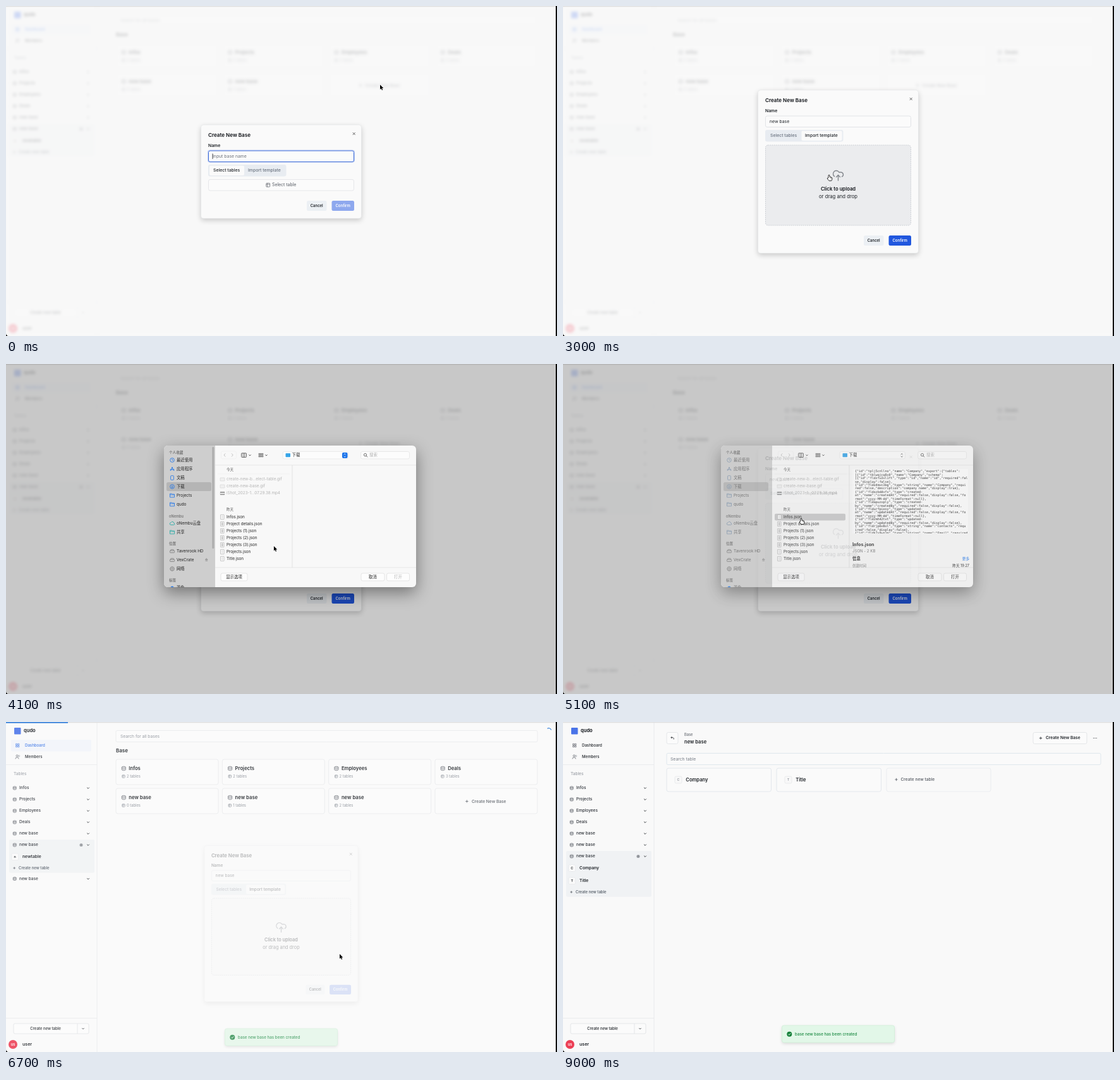
These frames come from a looping animation (872x522 px, 9700 ms). An HTML page with a canvas:

```html
<!DOCTYPE html>
<html lang="en">
<head>
<meta charset="utf-8">
<title>Create a base from a template</title>
<style>
html, body { margin: 0; width: 100%; height: 100%; overflow: hidden; background: #f9f9f9; }
canvas { display: block; width: 872px; height: 522px; }
</style>
</head>
<body>
<canvas id="stage"></canvas>
<script>
const W = 872, H = 522, LOOP = 9700, STEP = 100;
const S = window.devicePixelRatio || 1;
const BG = '#f9f9f9', INK = '#1f2328', SOFT = '#555a62', MUTED = '#8d929a';
const LINE = '#e6e8ea', BLUE = '#2157de';
const SANS = 'Inter, "Noto Sans CJK SC", "Noto Sans CJK", sans-serif';
const MONO = '"DejaVu Sans Mono", monospace';

function setup(cv) {
  cv.width = W * S;
  cv.height = H * S;
  const g = cv.getContext('2d');
  g.scale(S, S);
  return g;
}
const main = setup(document.getElementById('stage'));
const spare = setup(document.createElement('canvas'));
let c = main;

// ---------- drawing helpers ----------
function txt(s, x, y, size, color = INK, weight = 400, align = 'left', face = SANS) {
  c.font = `${weight} ${size}px ${face}`;
  c.fillStyle = color;
  c.textAlign = align;
  c.textBaseline = 'middle';
  c.fillText(s, x, y);
}
function box(x, y, w, h, r, fill, stroke, lw = 0.8) {
  c.beginPath();
  c.roundRect(x, y, w, h, r);
  if (fill) { c.fillStyle = fill; c.fill(); }
  if (stroke) { c.strokeStyle = stroke; c.lineWidth = lw; c.stroke(); }
}
function shadowBox(x, y, w, h, r, fill, blur, dy, alpha) {
  c.save();
  c.shadowColor = `rgba(0,0,0,${alpha})`;
  c.shadowBlur = blur * S;
  c.shadowOffsetY = dy * S;
  box(x, y, w, h, r, fill);
  c.restore();
}
function path(points, color, lw = 0.8) {
  c.beginPath();
  for (let i = 0; i < points.length; i += 2) c.lineTo(points[i], points[i + 1]);
  c.strokeStyle = color;
  c.lineWidth = lw;
  c.stroke();
}
function ring(x, y, r, color, lw = 0.8, from = 0, to = 7) {
  c.beginPath();
  c.arc(x, y, r, from, Math.min(to, from + Math.PI * 2));
  c.strokeStyle = color;
  c.lineWidth = lw;
  c.stroke();
}
function dot(x, y, r, color) {
  c.beginPath();
  c.arc(x, y, r, 0, 7);
  c.fillStyle = color;
  c.fill();
}
const chevron = (x, y, color = INK, r = 1.8) =>
  path([x - r, y - r / 2, x, y + r / 2, x + r, y - r / 2], color, 0.9);
function plus(x, y, color, r = 2.2) {
  path([x - r, y, x + r, y], color);
  path([x, y - r, x, y + r], color);
}
function grid(x, y, s, color) {
  box(x - s / 2, y - s / 2, s, s, 0.8, null, color, 0.7);
  path([x - s / 2, y - s / 6, x + s / 2, y - s / 6], color, 0.6);
  path([x - s / 6, y - s / 2, x - s / 6, y + s / 2], color, 0.6);
}
function drum(x, y, s, color) {
  const w = s / 2, h = s * 0.36;
  c.beginPath();
  c.ellipse(x, y - h, w, s * 0.17, 0, 0, 7);
  c.moveTo(x - w, y - h);
  c.lineTo(x - w, y + h);
  c.ellipse(x, y + h, w, s * 0.17, 0, Math.PI, 0, true);
  c.lineTo(x + w, y - h);
  c.moveTo(x - w, y);
  c.ellipse(x, y, w, s * 0.17, 0, Math.PI, 0, true);
  c.strokeStyle = color;
  c.lineWidth = 0.7;
  c.stroke();
}
// Draws a group on its own surface so that it fades as one.
function layer(alpha, draw) {
  if (alpha <= 0) return;
  if (alpha >= 1) return draw();
  c = spare;
  c.clearRect(0, 0, W, H);
  draw();
  c = main;
  c.globalAlpha = alpha;
  c.drawImage(spare.canvas, 0, 0, W, H);
  c.globalAlpha = 1;
}

// ---------- timing ----------
const clamp = (v, a = 0, b = 1) => Math.max(a, Math.min(b, v));
// keys: rows of [time, value, ...]
function track(t, keys, ease = u => u) {
  let i = 0;
  while (i < keys.length - 2 && t >= keys[i + 1][0]) i++;
  const a = keys[i], b = keys[i + 1];
  const u = ease(clamp((t - a[0]) / (b[0] - a[0])));
  return a.slice(1).map((v, k) => v + (b[k + 1] - v) * u);
}
const smooth = u => u * u * (3 - 2 * u);

const POINTER = [
  [100, 592, 124.5], [600, 470, 244], [1800, 470, 244], [2200, 412, 258], [2400, 412, 258],
  [2900, 421, 267], [3500, 421, 267], [3700, 426, 290], [4000, 426, 290], [4800, 377, 244],
  [5100, 377, 244], [5300, 394, 242], [5600, 440, 262], [6300, 528, 367], [6900, 528, 367],
  [7900, 306, 217], [8100, 293, 200], [8400, 293, 200], [8800, 640, 20]
];
const DIM = [[3400, 0], [3700, 0.13], [3900, 0.195], [5100, 0.195], [5200, 0.1], [5300, 0.014], [5400, 0]];
const PANEL_Y = [[3500, 114], [3700, 124], [3900, 129], [5100, 129], [5300, 115], [5400, 112]];
const PANEL_FADE = [[3400, 0], [3600, 1], [5000, 1], [5100, 0.82], [5200, 0.4], [5300, 0.07], [5400, 0]];

// ---------- application ----------
function sidebar(bases, open, tables, home) {
  path([144, 0, 144, H], LINE);
  path([0, 67.5, 144, 67.5], LINE);
  path([0, 468.5, 144, 468.5], LINE);
  box(13, 9, 10.5, 10.5, 1, '#4a74e8');
  txt('qudo', 28, 14, 7.5, INK, 700);
  if (home) box(8, 28, 127, 18.5, 2, '#f1f4f9');
  const tint = home ? '#3b74e6' : SOFT;
  for (let i = 0; i < 4; i++) box(15.5 + (i % 2) * 3.2, 34.3 + (i >> 1) * 3.2, 2.2, 2.2, 0.3, null, tint, 0.7);
  txt('Dashboard', 30, 37.5, 6.1, home ? tint : INK, 500);
  ring(17.5, 53.5, 1.5, SOFT, 0.7);
  ring(17.5, 58.5, 2.6, SOFT, 0.7, Math.PI, Math.PI * 2);
  ring(20.5, 53.8, 1.2, MUTED, 0.7);
  txt('Members', 30, 55.5, 6.1, INK, 500);
  txt('Tables', 12, 82, 6.6, MUTED);

  let y = 104.5;
  bases.forEach((name, i) => {
    const opened = i === open;
    const end = y + 16.5 + tables.length * 20;
    if (opened) box(5, y - 8.5, 135, end - y + 16, 2, '#f0f2f4');
    drum(13.7, y, 4.8, SOFT);
    txt(name, 21, y, 6.5, '#2c3037', 450);
    chevron(130, y);
    if (opened) {
      dot(119, y, 2.6, '#a2a6ad');
      ring(119, y, 1, '#777', 0.6);
      tables.forEach((s, k) => {
        const ty = y + 18.5 + 20 * k;
        box(9, ty - 5, 10.5, 10.5, 1.5, '#fafafa', '#e2e4e7', 0.6);
        txt(s[0], 14.2, ty + 0.2, 5.3, INK, 600, 'center');
        txt(s, 26, ty, 6.7, INK, 600);
      });
      plus(13.2, end, SOFT, 1.8);
      txt('Create new table', 20, end, 6, '#4d5661', 500);
      y = end + 17;
    } else y += 18;
  });

  box(12, 477, 119, 16, 2, '#fbfbfb', '#dfe1e4');
  path([113, 477, 113, 493], '#dfe1e4');
  txt('Create new table', 62.5, 485, 6, INK, 500, 'center');
  chevron(122, 485, INK, 1.5);
  dot(11, 510, 7, '#ec3f55');
  txt('us', 11, 510, 5.6, '#fff', 600, 'center');
  txt('user', 26, 510, 7, INK, 600);
}

function dashboard(created) {
  const bases = ['Infos', 'Projects', 'Employees', 'Deals', 'new base', 'new base'];
  const counts = [2, 2, 2, 3, 0, 1, 2];
  if (created) bases.push('new base');
  sidebar(bases, 5, ['newtable'], true);
  box(174, 13.5, 667, 18, 2, '#fafafa', LINE);
  txt('Search for all bases', 181, 22.5, 6.65, MUTED);
  txt('Base', 174, 45.5, 8, INK, 600);
  for (let i = 0; i <= bases.length; i++) {
    const x = 174 + (i % 4) * 168.3, y = i < 4 ? 59 : 105;
    box(x, y, 162, 40, 3, '#fafafa', LINE);
    if (i < bases.length) {
      drum(x + 12.3, y + 14.5, 6, SOFT);
      txt(bases[i], x + 20.3, y + 14.5, 7.7, INK, 600);
      grid(x + 12, y + 27, 4.4, MUTED);
      txt(counts[i] + ' tables', x + 17, y + 27, 5.8, MUTED);
    } else {
      plus(x + 50.5, y + 20.5, SOFT);
      txt('Create New Base', x + 58, y + 20.5, 6.65, SOFT, 500);
    }
  }
}

function basePage() {
  const bases = ['Infos', 'Projects', 'Employees', 'Deals', 'new base', 'new base', 'new base'];
  const tables = ['Company', 'Title'];
  sidebar(bases, 6, tables, false);
  box(164, 16.5, 18, 18, 2.5, '#fbfbfb', '#e0e2e5');
  path([172.3, 23, 171, 24.6, 172.3, 26.2], INK);
  path([171, 24.6, 174.2, 24.6, 175.2, 25.6, 175.2, 27.5], INK);
  txt('Base', 192, 20.5, 5.75, SOFT);
  txt('new base', 192, 31.5, 7.6, INK, 600);
  box(744, 16.5, 85, 18, 2.5, '#fbfbfb', '#dfe1e4');
  plus(756, 25.5, INK);
  txt('Create New Base', 764, 25.5, 6.6, INK, 600);
  for (let i = -1; i < 2; i++) dot(842 + i * 2.3, 25.5, 0.6, INK);
  box(164, 49.5, 687, 18, 2, '#fafafa', '#d8e2ea');
  txt('Search table', 170, 58.5, 6.8, '#777d86');
  tables.forEach((s, i) => {
    const x = 164 + i * 174;
    box(x, 73, 165.5, 37, 3, '#fafafa', '#dde3e9');
    box(x + 13, 86, 11, 11, 2, '#f8f8f8', '#dfe1e4', 0.6);
    txt(s[0], x + 18.5, 91.7, 5.4, MUTED, 500, 'center');
    txt(s, x + 30.3, 91.7, 7.6, INK, 600);
  });
  box(512, 73, 165, 37, 3, null, '#e6eaee');
  plus(527.5, 91, SOFT);
  txt('Create new table', 534.5, 91, 6.65, SOFT, 500);
}

function modal(m) {
  const x = 308.5, w = 254, h = m.big ? 258 : 148, y = m.big ? 133 : 188;
  shadowBox(x, y, w, h, 4, '#fafafa', 9, 3, 0.2);
  box(x, y, w, h, 4, null, '#e3e4e6', 0.6);
  txt('Create New Base', 320, y + 17, 8.1, '#0e1116', 600);
  const k = y + 14;
  path([548.7, k - 2, 552.7, k + 2], '#444');
  path([548.7, k + 2, 552.7, k - 2], '#444');
  txt('Name', 320, y + 32.7, 6.8, INK, 600);

  if (m.focus) box(319.5, y + 40, 232, 19, 3, null, '#c9d6f5', 1.2);
  box(320.5, y + 41, 230, 17.5, 2.5, '#fbfbfb', m.focus ? '#3a69d8' : '#dcdfe3', m.focus ? 1 : 0.8);
  txt(m.name || 'Input base name', 327, y + 49.8, 6.85, m.name ? INK : '#6d737c');
  if (m.caret) {
    const cx = 327 + (m.name ? c.measureText(m.name).width + 0.5 : 0);
    path([cx, y + 45.5, cx, y + 54], INK, 0.8);
  }

  box(320, y + 63, 123.5, 18.5, 3, '#e8ecf1');
  if (m.big) box(377.5, y + 64.5, 64, 15.5, 2, '#fafafa');
  else box(322, y + 64.5, 55, 15.5, 2, '#fafafa');
  txt('Select tables', 328, y + 72.3, 6.85, m.big ? '#69727f' : INK, 500);
  txt('Import template', 383, y + 72.3, 6.85, m.big ? INK : '#69727f', 500);

  if (m.big) {
    c.setLineDash([1.8, 1.4]);
    box(320.5, y + 87, 230, 127, 4, m.hover ? '#ebecee' : '#f7f7f8', '#bfc4cb');
    c.setLineDash([]);
    cloud(435.5, y + 134, '#82868c');
    txt('Click to upload', 435.5, y + 156.3, 7.7, '#15181d', 600, 'center');
    txt('or drag and drop', 435.5, y + 168.3, 7.7, INK, 400, 'center');
  } else {
    box(320.5, y + 86.5, 230, 17.5, 2.5, '#fbfbfb', '#e1e3e6');
    grid(414.7, y + 95.2, 5.8, SOFT);
    txt('Select table', 421, y + 95.2, 6.9, SOFT);
  }
  const by = y + h - 28;
  box(476, by, 31.5, 16, 2.5, '#ecf0f4');
  txt('Cancel', 491.7, by + 8, 5.95, INK, 600, 'center');
  box(515.5, by, 35.5, 16, 2.5, m.ready ? BLUE : '#8ea8ee');
  txt('Confirm', 533.2, by + 8, 6, '#fff', 600, 'center');
}

function cloud(x, y, color) {
  c.lineCap = 'round';
  c.beginPath();
  c.arc(x - 3, y - 1.5, 5, 2.2, 5.75);
  c.arc(x + 4.3, y - 0.3, 3.7, -1.75, 1.1);
  c.strokeStyle = color;
  c.lineWidth = 1.4;
  c.stroke();
  path([x, y + 9, x, y + 0.5], color, 1.4);
  path([x - 3, y + 3.5, x, y + 0.5, x + 3, y + 3.5], color, 1.4);
  c.lineCap = 'butt';
}

// ---------- file panel ----------
const PREVIEW = `{"id":"tplj5cnllno","name":"Company","export":{"tables":
[{"id":"tblwqjcq8x0","name":"Company","schema":
[{"id":"fldzfu3xl1ft","type":"id","name":"id","required":fal
se,"display":false},
{"id":"fldo4mvc3bg","type":"string","name":"Company","requi
red":false,"description":"company name","display":true},
{"id":"fldozbddvfx","type":"created-
at","name":"createdAt","required":false,"display":false,"fo
rmat":"yyyy-MM-dd","timeFormat":null},
{"id":"fldapuzxply","type":"created-
by","name":"createdBy","required":false,"display":false},
{"id":"fldurfpiosy","type":"updated-
at","name":"updatedAt","required":false,"display":false,"fo
rmat":"yyyy-MM-dd","timeFormat":null},
{"id":"fld2mh42tvt","type":"updated-
by","name":"updatedBy","required":false,"display":false},
{"id":"fldrjp6vBxl","type":"string","name":"Contacts","requ
ired":false,"display":false},
{"id":"fldk2x9wq1m","type":"string","name":"Email","required`.split('\n');

const folder = (x, y, color) => {
  path([x - 3.5, y - 1, x + 3.5, y - 1], color, 0.7);
  c.beginPath();
  c.moveTo(x - 3.5, y + 2.8);
  [[-3.5, -2.8], [-0.8, -2.8], [0, -2], [3.5, -2], [3.5, 2.8]].forEach(([a, b]) => c.lineTo(x + a, y + b));
  c.closePath();
  c.strokeStyle = color;
  c.lineWidth = 0.8;
  c.stroke();
};
const PLACE = {
  clock(x, y, k) { ring(x, y, 3.3, k); path([x, y - 2, x, y, x + 1.5, y + 0.8], k); },
  apps(x, y, k) {
    path([x - 3, y + 3, x + 0.6, y - 3], k, 0.9);
    path([x + 3, y + 3, x - 0.6, y - 3], k, 0.9);
    path([x - 3.4, y + 1, x + 3.4, y + 1], k, 0.9);
  },
  doc(x, y, k) { box(x - 2.4, y - 3.3, 4.8, 6.6, 0.8, null, k); },
  down(x, y, k) {
    ring(x, y, 3.3, k);
    path([x, y - 1.8, x, y + 1.6], k);
    path([x - 1.4, y + 0.3, x, y + 1.7, x + 1.4, y + 0.3], k);
  },
  folder,
  cloud(x, y, k) {
    c.beginPath();
    c.arc(x - 2, y + 0.7, 1.8, 1.6, 4.7);
    c.arc(x + 0.3, y - 0.4, 2.2, 3.6, 6);
    c.arc(x + 2.3, y + 1, 1.5, -1.6, 1.6);
    c.closePath();
    c.strokeStyle = k;
    c.lineWidth = 0.8;
    c.stroke();
  },
  disk(x, y, k) { box(x - 3.5, y - 0.5, 7, 3, 0.8, null, k); path([x - 3.2, y - 0.5, x - 2, y - 2.5, x + 2, y - 2.5, x + 3.2, y - 0.5], k); },
  globe(x, y, k) { ring(x, y, 3.2, k); path([x - 3.2, y, x + 3.2, y], k, 0.6); path([x, y - 3.2, x, y + 3.2], k, 0.6); }
};

function panel(p) {
  const T = p.top;
  shadowBox(250, T, 399, 224, 6, '#f8f8f8', 26, 9, 0.42);
  c.save();
  c.beginPath();
  c.roundRect(250, T, 399, 224, 6);
  c.clip();
  c.fillStyle = '#cecece';
  c.fillRect(250, T, 81, 224);
  c.translate(0, T);

  const tint = p.active ? '#1a73ea' : '#7f95ad';
  const ink = p.active ? '#222' : '#666';
  const head = (s, y) => txt(s, 258, y, 5.6, '#777', 600);
  const place = (icon, s, y, k = tint) => {
    PLACE[icon](263, y, k);
    txt(s, 270, y, 6.35, ink);
  };
  box(254, 58, 71, 14, 2.5, '#b5b5b5');
  head('个人收藏', 11.5);
  place('clock', '最近使用', 23);
  place('apps', '应用程序', 37);
  place('doc', '文稿', 51);
  place('down', '下载', 65);
  place('folder', 'Projects', 79);
  place('folder', 'qudo', 93);
  head('oNembu', 112);
  const teal = p.active ? '#1fa9a4' : tint;
  place('cloud', 'oNembu云盘', 123, teal);
  place('folder', '共享', 137, teal);
  head('位置', 155.5);
  place('disk', 'Tavenrook HD', 167, '#777');
  let y = 185;
  if (p.mounted) {
    place('disk', 'VexCrate', 181, '#777');
    path([315.5, 180.5, 317.2, 178.5, 319, 180.5, 315.5, 180.5], '#777', 0.7);
    path([315.5, 182.3, 319, 182.3], '#777', 0.7);
    place('globe', '网络', 195, '#777');
    y += 28;
  }
  head('标签', y);
  [['蓝色', '#1a73ea'], ['灰色', '#6d6d6d'], ['工作', '#cecece']].forEach(([s, k], i) => {
    dot(263, y + 12 + i * 14, 2.6, k);
    txt(s, 270, y + 12 + i * 14, 6.35, ink);
  });
  if (p.thumb > 0) {
    c.globalAlpha = p.thumb;
    box(326.3, 2, 3, 161, 1.5, '#adadad');
    c.globalAlpha = 1;
  }

  // toolbar
  path([347.2, 12.5, 345, 15, 347.2, 17.5], '#bbb', 0.9);
  path([357, 12.5, 359.2, 15, 357, 17.5], '#bbb', 0.9);
  box(340.5, 9, 24, 12, 2.5, null, '#ececec', 0.6);
  box(372.5, 12, 8, 6.5, 1, null, '#444');
  path([375.2, 12, 375.2, 18.5], '#444');
  path([377.8, 12, 377.8, 18.5], '#444');
  chevron(386, 15.3, '#444', 1.6);
  for (let i = 0; i < 6; i++) box(400 + (i % 3) * 2.6, 12.5 + (i > 2) * 3.3, 1.7, 2.2, 0.3, null, '#444', 0.7);
  chevron(412, 15.3, '#444', 1.6);
  box(438, 9.5, 103.5, 11.5, 2.5, '#fcfcfc', '#e3e3e3', 0.6);
  box(442.5, 12.3, 7.5, 6, 0.8, '#35a4e8');
  txt('下载', 452.5, 15.2, 6.4, '#222');
  if (p.active) box(532, 11, 8.5, 9, 2, '#1a73ea');
  const arrow = p.active ? '#fff' : '#444';
  path([534.7, 14.2, 536.2, 12.8, 537.7, 14.2], arrow, 0.8);
  path([534.7, 16.8, 536.2, 18.2, 537.7, 16.8], arrow, 0.8);
  box(561.5, 9.5, 77, 11.5, 2.5, '#fcfcfc', '#dedede', 0.6);
  ring(568.5, 14.7, 2.1, '#444');
  path([570, 16.3, 572, 18.3], '#444', 0.9);
  txt('搜索', 575, 15.3, 6.4, '#b0b0b0');
  path([331, 31, 649, 31], '#dedede', 0.7);
  path([453, 31, 453, 193], '#dadada', 0.7);
  path([331, 193, 649, 193], '#dedede', 0.7);

  // files
  txt('今天', 349, 38, 5.5, '#555', 500);
  path([335, 45, 449, 45], '#ececec', 0.6);
  ['create-new-b…elect-table.gif', 'create-new-base.gif', 'iShot_2023-1…07.29.38.mp4'].forEach((s, i) => {
    const fy = 53.5 + i * 11;
    box(339, fy - 2.5, 7, 5, 0.4, '#f0f0f0', '#d0d0d0', 0.6);
    if (i === 2) path([339, fy - 1.6, 346, fy - 1.6], '#888', 1.5), path([339, fy + 1.8, 346, fy + 1.8], '#888', 1.2);
    txt(s, 349, fy, 6.3, '#b4b4b4');
  });
  txt('昨天', 349, 101, 5.5, '#555', 500);
  if (p.chosen) box(335, 107.8, 112, 10.6, 2, '#cacaca');
  ['Infos', 'Project details', 'Projects (1)', 'Projects (2)', 'Projects (3)', 'Projects', 'Title'].forEach((s, i) => {
    const fy = 113 + i * 11;
    box(339.5, fy - 3.6, 5.6, 7.2, 0.5, '#fff', '#a5a5a5', 0.6);
    for (let k = -1; k < 2; k++) path([340.8, fy + k * 1.6, 343.8, fy + k * 1.6], i > 0 && i < 5 ? '#777' : '#c5c5c5', 0.6);
    txt(s + '.json', 349, fy, 6.3, '#222');
  });

  if (p.chosen) {
    c.save();
    c.beginPath();
    c.rect(458, 37, 183, 102);
    c.clip();
    c.fillStyle = '#fdfdfd';
    c.fillRect(458, 37, 183, 102);
    PREVIEW.forEach((s, i) => txt(s, 462, 41 + i * 5.43, 4.95, '#222', 400, 'left', MONO));
    c.restore();
    txt('Infos.json', 458, 157, 7.1, '#333', 700);
    txt('JSON - 2 KB', 458, 167, 6.1, '#777');
    txt('信息', 458, 179.3, 6.4, '#222', 700);
    txt('更多', 643, 179.3, 5.6, '#1a73ea', 500, 'right');
    txt('创建时间', 458, 190, 5.5, '#777');
    txt('昨天 19:27', 643, 190, 5.6, '#222', 400, 'right');
  }
  [['显示选项', 340, 42], ['取消', 562, 37], ['打开', 602.5, 36]].forEach(([s, x, w], i) => {
    box(x, 202, w, 12, 2.5, '#fdfdfd', '#dcdcdc', 0.7);
    txt(s, x + w / 2, 208, 6.4, i === 2 && !p.chosen ? '#b5b5b5' : '#222', 400, 'center');
  });
  c.restore();
}

function toast(dy) {
  shadowBox(346.5, 480 + dy, 178, 27, 3, '#e2f7e8', 5, 2, 0.13);
  box(346.5, 480 + dy, 178, 27, 3, null, '#cdf0d6', 0.7);
  dot(358.3, 493.7 + dy, 4, '#15803a');
  path([356.4, 493.8 + dy, 357.8, 495.2 + dy, 360.3, 492.3 + dy], '#fff', 0.9);
  txt('base new base has been created', 367, 493.7 + dy, 6.25, '#1c8a43', 500);
}

function progress(t) {
  if (t < 6600 || t >= 7300) return;
  c.globalAlpha = t < 7000 ? 1 : 1 - (t - 7000) / 300;
  c.fillStyle = '#3f86dc';
  c.fillRect(0, 0, t < 7000 ? 98 + (t - 6700) * 0.3 : 870, 1.8);
  ring(859, 13.5, 3.8, '#3f86dc', 1.2, -2.2 + (t - 6700) * 0.0157, -0.2 + (t - 6700) * 0.0157);
  c.globalAlpha = 1;
}

function pointer(x, y, hand) {
  c.save();
  c.translate(x, y);
  c.lineJoin = 'round';
  if (hand) {
    c.beginPath();
    c.moveTo(-1, 5);
    [[-1, 0.8], [0, 0], [1, 0.8], [1, 3.3], [4, 4], [5, 5], [4.6, 8], [3.8, 9.5], [0, 9.5], [-2.8, 6], [-2.4, 5]]
      .forEach(q => c.lineTo(...q));
    c.closePath();
    c.fillStyle = '#fff';
    c.fill();
    c.strokeStyle = '#222';
    c.lineWidth = 0.9;
    c.stroke();
    path([2.2, 4, 2.2, 6], '#555', 0.5);
    path([3.5, 4.2, 3.5, 6], '#555', 0.5);
  } else {
    c.beginPath();
    [[0, 0], [0, 7.6], [1.8, 6], [3, 8.7], [4.2, 8.2], [3, 5.6], [5.4, 5.5]].forEach(q => c.lineTo(...q));
    c.closePath();
    c.strokeStyle = '#fff';
    c.lineWidth = 1.2;
    c.stroke();
    c.fillStyle = '#000';
    c.fill();
  }
  c.restore();
}

function screenEdge() {
  c.fillStyle = '#dedede';
  c.fillRect(0, 0, 870, 1.3);
}
function bezel() {
  c.fillStyle = '#000';
  c.fillRect(870, 0, 2, H);
  c.beginPath();
  c.moveTo(0, H - 4);
  c.quadraticCurveTo(0.3, H - 0.3, 4, H);
  c.lineTo(0, H);
  c.fill();
}
function wash(color, alpha) {
  c.globalAlpha = alpha;
  c.fillStyle = color;
  c.fillRect(0, 0, W, H);
  c.globalAlpha = 1;
}

// The page behind the modal, softened once.
const veil = document.createElement('canvas');
function makeVeil() {
  const g = setup(veil);
  c = spare;
  wash(BG, 1);
  dashboard(false);
  g.fillStyle = BG;
  g.fillRect(0, 0, W, H);
  g.filter = `blur(${2 * S}px)`;
  g.drawImage(spare.canvas, 0, 0, W, H);
  g.filter = 'none';
  c = g;
  wash(BG, 0.76);
  c = main;
}

function render(t) {
  c = main;
  wash(BG, 1);
  const out = clamp((t - 6500) / 235);
  const [px, py] = track(t, POINTER, smooth);
  const big = t >= 2300;
  const picking = t >= 3400 && t < 5050;
  const hover = big && t < 6500 && px > 320 && px < 551 && py > 220 && py < 347;

  if (t >= 7000) basePage();
  else if (t >= 6600) {
    dashboard(true);
    wash(BG, 0.76 * (1 - out));
  } else c.drawImage(veil, 0, 0, W, H);
  screenEdge();

  if (t < 6800) {
    const name = 'new base'.slice(0, clamp(Math.floor((t - 700) / 120) + 1, 0, 8));
    const focus = t < 2300;
    layer(out < 1 ? 1 - 0.85 * out : 0, () => {
      c.save();
      c.translate(435.5, 262 + 67 * out);
      c.scale(1 - 0.05 * out, 1 - 0.05 * out);
      c.translate(-435.5, -262);
      modal({ big, name, focus, hover, caret: focus && t % 1000 < 500, ready: name && t < 6400 });
      c.restore();
    });
  }

  const [dim] = track(t, DIM);
  if (dim > 0) wash('#000', dim);
  layer(track(t, PANEL_FADE)[0], () => panel({
    top: track(t, PANEL_Y)[0],
    active: t < 5100,
    mounted: t >= 3900,
    chosen: t >= 5000,
    thumb: 1 - clamp((t - 4200) / 300)
  }));

  if (t >= 6600) {
    const rise = clamp((t - 6500) / 300);
    layer(rise < 1 ? 0.2 + rise * 0.8 : 1, () => toast(15 * (1 - rise)));
  }
  progress(t);
  const typing = t >= 700 && t < 1800;
  if (!typing && t < 8800) pointer(px, py, hover && !picking);
  bezel();
}

makeVeil();
function tick(now) {
  render(Math.floor((now % LOOP) / STEP) * STEP);
  requestAnimationFrame(tick);
}
requestAnimationFrame(tick);
</script>
</body>
</html>
```
